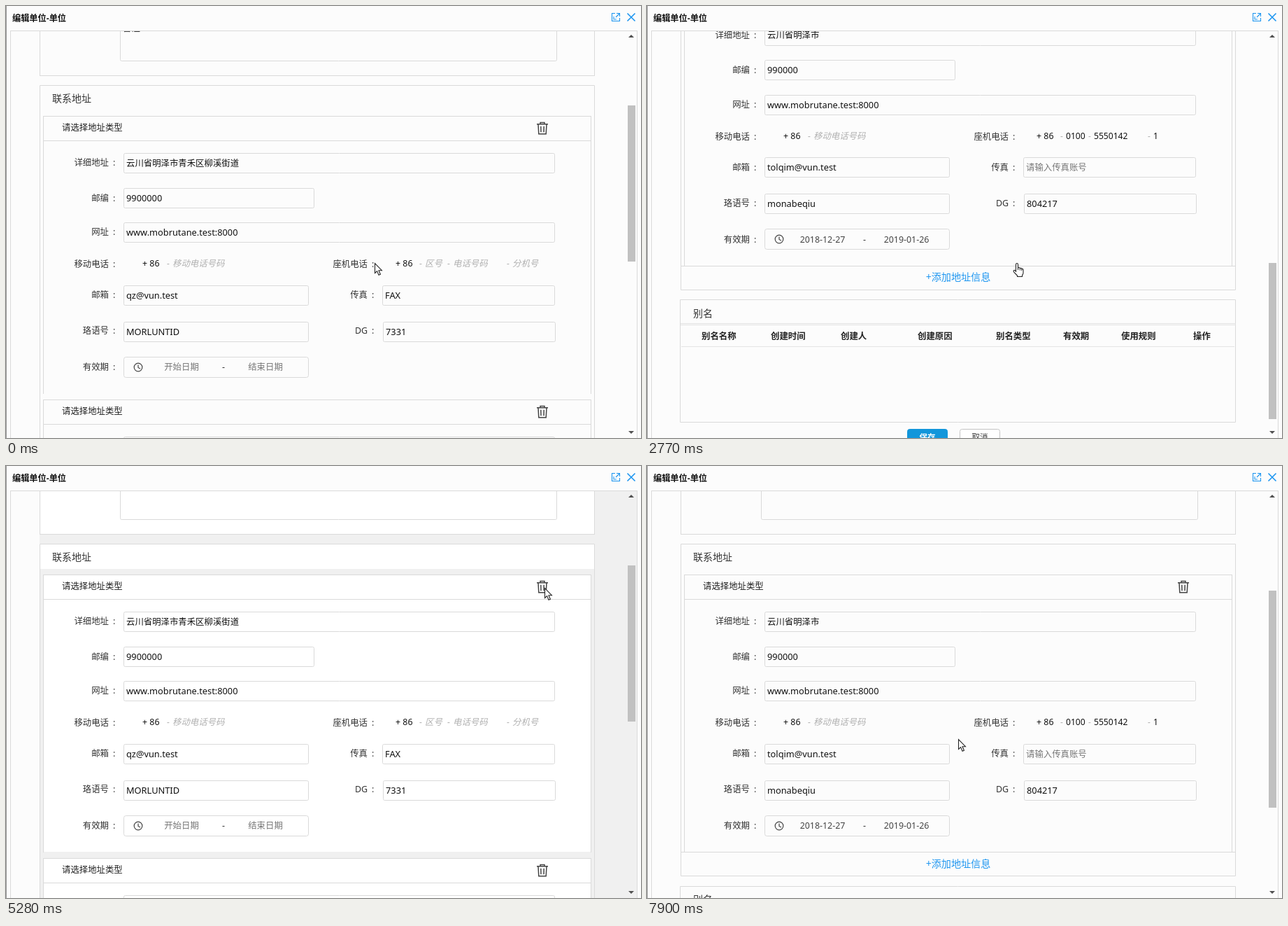
Recreate the animation shown at these times as an HTML page with a canvas. Size 908 by 617 pixels, loop 8 s.

```html
<!DOCTYPE html>
<html lang="zh-CN">
<head>
<meta charset="utf-8">
<style>
html, body { margin: 0; width: 100%; height: 100%; overflow: hidden; background: #fcfcfc; }
canvas { display: block; }
</style>
</head>
<body>
<canvas id="stage" width="908" height="617"></canvas>
<script>
const ctx = document.getElementById('stage').getContext('2d');
const LOOP = 8000;
const FAMILY = '"Noto Sans", "Noto Sans CJK SC", sans-serif';
const LINE = '#dadada', PAPER = '#fcfcfc', BLUE = '#1e96f0';
const CARD_STEP = 405;

// [time, y of the first address card]
const SCROLL = [
  [0, 157], [150, 130], [270, 57], [550, 0], [700, -43], [820, -143], [940, -243],
  [1240, -283.5], [1390, -343], [1700, -400], [1820, -443], [1960, -462],
  [2770, -430.5], [2890, -385], [3010, -362], [3130, -350], [3530, -300], [3650, -262],
  [3770, -215], [3920, -180], [4070, -150], [4190, -97.6], [4340, 0], [4460, 85],
  [4610, 138], [4740, 155]
];

// [time, x, y, shape]
const POINTER = [
  [0, 527, 367, 'arrow'], [1820, 527, 367, 'hand'], [2890, 527, 367, 'arrow'],
  [3530, 541, 366, 'arrow'], [4190, 541, 366, 'beam'], [4340, 541, 366, 'arrow'],
  [4460, 560, 355, 'arrow'], [4610, 650, 290, 'arrow'], [4740, 743, 219, 'arrow'],
  [4890, 758, 191, 'arrow'], [5040, 764, 181, 'arrow'], [5160, 768, 176, 'arrow'],
  [5280, 770, 174, 'arrow'], [5870, 700, 222, 'arrow'], [6000, 609, 270, 'arrow'],
  [6150, 530, 312, 'arrow'], [6270, 470, 345, 'arrow'], [6390, 440, 360, 'hand'],
  [6510, 435, 363, 'hand'], [7410, 435, 363, 'arrow'], [7780, 440, 379, 'arrow'],
  [7900, 445, 390, 'arrow']
];

const FIRST = {
  address: '云川省明泽市青禾区柳溪街道', zip: '9900000', site: 'www.mobrutane.test:8000',
  mail: 'qz@vun.test', fax: 'FAX', chat: 'MORLUNTID', number: '7331'
};
const SECOND = {
  address: '云川省明泽市', zip: '990000', site: 'www.mobrutane.test:8000',
  phone: ['0100', '5550142', '1'], mail: 'tolqim@vun.test', chat: 'monabeqiu',
  number: '804217', dates: ['2018-12-27', '2019-01-26']
};

function keyAt(keys, t) {
  let found = keys[0];
  for (const key of keys) if (key[0] <= t) found = key;
  return found;
}

// Scrolled offsets can be fractional; edges snap to whole pixels.
const snap = Math.round;

function rect(x, y, w, h, color) {
  ctx.fillStyle = color;
  ctx.fillRect(x, snap(y), w, snap(y + h) - snap(y));
}
function hline(x1, x2, y, color = LINE) {
  rect(x1, snap(y), x2 - x1 + 1, 1, color);
}
const vline = (x, y1, y2, color = LINE) => rect(x, y1, 1, y2 - y1 + 1, color);

function box(x1, y1, x2, y2, { fill, stroke = LINE, radius = 2 } = {}) {
  ctx.beginPath();
  ctx.roundRect(x1 + .5, snap(y1) + .5, x2 - x1, snap(y2) - snap(y1), radius);
  if (fill) { ctx.fillStyle = fill; ctx.fill(); }
  if (stroke) { ctx.strokeStyle = stroke; ctx.lineWidth = 1; ctx.stroke(); }
}

// y is the vertical middle of the glyphs
function text(str, x, y, { size = 12.4, color = '#222', style = '', align = 'left' } = {}) {
  ctx.font = `${style} ${size}px ${FAMILY}`;
  ctx.fillStyle = color;
  ctx.textAlign = align;
  ctx.fillText(str, x, snap(y + size * .36));
}

function stroke(color, width, ...lines) {
  ctx.strokeStyle = color;
  ctx.lineWidth = width;
  ctx.beginPath();
  for (const pts of lines) {
    for (let i = 0; i < pts.length; i += 2) {
      if (i) ctx.lineTo(pts[i], pts[i + 1]);
      else ctx.moveTo(pts[i], pts[i + 1]);
    }
  }
  ctx.stroke();
}

function triangle(x, y, dx, dy, color = '#505050') {
  ctx.fillStyle = color;
  ctx.beginPath();
  ctx.moveTo(x + dx * 2, y + dy * 2);
  ctx.lineTo(x - dx * 2 + dy * 4, y - dy * 2 + dx * 4);
  ctx.lineTo(x - dx * 2 - dy * 4, y - dy * 2 - dx * 4);
  ctx.fill();
}

const cross = (x, y, r) => stroke(BLUE, 1.6, [x - r, y - r, x + r, y + r], [x + r, y - r, x - r, y + r]);

function label(str, right, y) {
  text(str, right, y, { color: '#333', align: 'right' });
  text(':', right + 6, y, { color: '#333' });
}

function field(x1, x2, y, value, hint) {
  box(x1, y, x2, y + 28);
  if (value) text(value, x1 + 4, y + 14.4, { size: /^[\x00-\x7f]/.test(value) ? 12.8 : 12.4, color: '#111' });
  else if (hint) text(hint, x1 + 4, y + 14.4, { color: '#777' });
}

function trash(x, y) {
  stroke('#444', 1.5,
    [x - 8, y - 6, x + 8, y - 6], [x - 3, y - 6, x - 3, y - 8.2, x + 3, y - 8.2, x + 3, y - 6],
    [x - 6, y - 6, x - 5.2, y + 8, x + 5.2, y + 8, x + 6, y - 6],
    [x - 2.2, y - 3, x - 2, y + 5.5], [x + 2.2, y - 3, x + 2, y + 5.5]);
}

function clock(x, y) {
  ctx.strokeStyle = '#444';
  ctx.lineWidth = 1.2;
  ctx.beginPath();
  ctx.arc(x, y, 5.8, 0, Math.PI * 2);
  ctx.stroke();
  stroke('#444', 1.2, [x, y - 3.5, x, y + .5, x + 3, y + 2]);
}

function phoneParts(y, parts, hints, places) {
  hints.forEach((hint, i) => {
    const [dash, x] = places[i];
    const faint = { color: '#b0b0b0', style: 'italic' };
    text('-', dash, y, faint);
    if (parts) text(parts[i], x, y, { size: 12.1, color: '#111' });
    else text(hint, x, y, faint);
  });
}

function card(y, data) {
  hline(53, 836, y);
  hline(53, 836, y + 35);
  vline(53, y, y + 396);
  vline(836, y, y + 396);
  text('请选择地址类型', 80, y + 17);
  trash(767, snap(y) + 17.7);

  label('详细地址', 147, y + 67);
  field(168, 784, y + 53, data.address);
  label('邮编', 147, y + 117.5);
  field(168, 440, y + 102.6, data.zip);
  label('网址', 147, y + 166);
  field(168, 784, y + 152, data.site);

  label('移动电话', 147, y + 212);
  label('座机电话', 517, y + 212);
  for (const x of [195, 557]) text('+ 86', x, y + 211, { color: '#111' });
  phoneParts(y + 211, null, ['移动电话号码'], [[230, 238]]);
  phoneParts(y + 211, data.phone, ['区号', '电话号码', '分机号'], [[591, 599], [631, 639], [716, 724]]);

  label('邮箱', 147, y + 255.6);
  field(168, 432, y + 241.7, data.mail);
  label('传真', 517, y + 255.6);
  field(538, 784, y + 241.7, data.fax, '请输入传真账号');
  label('珞语号', 147, y + 307);
  field(168, 432, y + 293.6, data.chat);
  label('DG', 517, y + 307);
  field(539, 785, y + 293.6, data.number);

  label('有效期', 147, y + 358.8);
  box(168, y + 343.6, 432, y + 372.6, { radius: 3 });
  clock(189, snap(y + 343.6) + 15);
  const look = { align: 'center', color: data.dates ? '#444' : '#777' };
  const [from, to] = data.dates || ['开始日期', '结束日期'];
  text(from, 251, y + 358.8, look);
  text('-', 311, y + 358.8, { align: 'center', color: '#333' });
  text(to, 371, y + 358.8, look);
}

function aliasSection(y) {
  box(47, y, 841, y + 175, { radius: 0 });
  text('别名', 66, y + 19.5, { size: 14, color: '#333' });
  hline(48, 841, y + 34, '#e2e2e2');
  hline(48, 841, y + 36, '#e2e2e2');
  const heads = [['别名名称', 78], ['创建时间', 177], ['创建人', 277], ['创建原因', 387],
    ['别名类型', 499], ['有效期', 595], ['使用规则', 678], ['操作', 781]];
  for (const [name, x] of heads) text(name, x, y + 52, { style: 'bold' });
  hline(49, 839, y + 67, '#e4e4e4');

  box(372, y + 184.7, 429, y + 211.7, { fill: '#1296db', stroke: '#1296db', radius: 3 });
  text('保存', 401, y + 197, { size: 11.5, color: '#fff', style: 'bold', align: 'center' });
  box(447, y + 184.7, 504, y + 211.7, { fill: '#fff', stroke: '#c4c4c4', radius: 3 });
  text('取消', 476, y + 197, { size: 11.5, color: '#333', align: 'center' });
}

function shade(top, count) {
  rect(48, 35, 854, 582, '#f0f0f0');
  rect(48, 35, 794, top - 93, '#fff');
  rect(48, top - 44, 794, 36, '#fff');
  for (let i = 0; i < count; i++) rect(53, top + i * CARD_STEP, 784, 396, '#fff');
}

function page(top, cards, shaded) {
  if (shaded) shade(top, cards.length);
  // remarks section
  vline(48, 0, top - 58);
  vline(841, 0, top - 58);
  hline(48, 841, top - 58);
  box(163, top - 200, 787, top - 79);
  text('备注', 167, top - 125);

  // address section
  const end = top + (cards.length - 1) * CARD_STEP + 396;
  box(48, top - 44, 841, end + 34, { radius: 0 });
  text('联系地址', 66, top - 25, { size: 14, color: '#333' });
  cards.forEach((data, i) => card(top + i * CARD_STEP, data));
  hline(48, 841, end);
  text('+添加地址信息', 445, end + 16.7, { size: 14.1, color: BLUE, align: 'center' });

  aliasSection(end + 48.7);
}

function scrollbars(top, count, modal) {
  const view = modal ? 567 : 582, track = view - 31;
  const height = 1439 - (2 - count) * CARD_STEP;
  triangle(894, 43, 0, -1);
  triangle(894, 35 + view - 8, 0, 1);
  rect(889, Math.floor(51 + (395 - top) * track / height), 11, Math.round(track * view / height), '#c1c1c1');
  if (!modal) return;
  rect(7, 602, 880, 15, PAPER);
  rect(887, 602, 15, 15, '#dcdcdc');
  rect(22, 604, 836, 11, '#c1c1c1');
  triangle(14, 609.5, -1, 0, '#a3a3a3');
  triangle(880, 609.5, 1, 0);
}

function questionIcon(x, y) {
  const tone = ctx.createRadialGradient(x - 2, y - 5, 2, x, y, 15);
  tone.addColorStop(0, '#fff');
  tone.addColorStop(.5, '#cfe8fa');
  tone.addColorStop(1, '#4a9bd8');
  ctx.fillStyle = tone;
  ctx.beginPath();
  ctx.ellipse(x, y, 14, 13, 0, 0, Math.PI * 2);
  ctx.moveTo(x, y + 11);
  ctx.lineTo(x + 6, y + 16);
  ctx.lineTo(x + 8, y + 9);
  ctx.fill();
  text('?', x, y, { size: 19, color: '#0b3f94', style: 'bold', align: 'center' });
}

function dialog(hover) {
  rect(7, 35, 880, 567, 'rgba(0,0,0,.2)');
  box(348, 264, 559, 390, { fill: 'rgba(0,0,0,.13)', stroke: null, radius: 9 });
  box(351, 266, 556, 387, { fill: 'rgba(0,0,0,.13)', stroke: null, radius: 6 });
  const paper = ctx.createLinearGradient(0, 269, 0, 305);
  paper.addColorStop(0, '#f3f3f3');
  paper.addColorStop(1, '#fdfdfd');
  rect(354, 269, 200, 115, paper);
  text('提示', 362, 286.5, { size: 11, color: '#111', style: 'bold' });
  cross(540, 285, 5.5);
  questionIcon(382, 318);
  text('确定要删除该条地址信息？', 409, 314, { size: 10.9 });
  box(388, 349, 448, 373, hover ? { fill: '#e8f4ff', stroke: '#b9dcf7' } : { fill: '#fbfbfb' });
  box(460, 349, 520, 373, { fill: '#fbfbfb' });
  text('是', 418.5, 361, { size: 11, align: 'center', color: '#111' });
  text('否', 489.5, 361, { size: 11, align: 'center', color: '#111' });
}

function windowFrame() {
  vline(0, 0, 616, '#9a9a9a');
  text('编辑单位-单位', 9, 17.5, { size: 12.2, color: '#111', style: 'bold' });
  hline(6, 902, 35);
  vline(6, 35, 616);
  vline(902, 35, 616);
  stroke(BLUE, 1.1, [871, 10.5, 866.5, 10.5, 866.5, 21.5, 877.5, 21.5, 877.5, 17],
    [873, 10.5, 877.5, 10.5, 877.5, 15], [877.5, 10.5, 872, 16], [869, 15, 869, 19, 873, 19]);
  cross(894, 16, 5.5);
}

const SHAPES = {
  arrow: new Path2D('M.5 .5V14.5L3.6 11.6L6 17.2L8.4 16.2L6 10.7H10.4Z'),
  hand: new Path2D('M3.5 13V2.2Q3.5 .5 5 .5T6.5 2.2V7Q8.5 5.8 9.3 7.6Q11 6.6 11.8 8.5Q14 7.8 14 10.3V14Q14 16 12.5 17.5V19.5H5.5V18L1 13.4Q-.6 11.2 .8 10.5Q2 10 3.5 12')
};

function pointer([, x, y, shape]) {
  if (shape === 'beam') {
    stroke('#222', 1.2, [x - 3, y + .5, x + 3, y + .5], [x, y, x, y + 14], [x - 3, y + 14, x + 3, y + 14]);
    return;
  }
  ctx.save();
  ctx.translate(shape === 'hand' ? x - 3 : x, y);
  ctx.fillStyle = '#fff';
  ctx.strokeStyle = '#222';
  ctx.lineWidth = 1.1;
  ctx.fill(SHAPES[shape]);
  ctx.stroke(SHAPES[shape]);
  if (shape === 'hand') stroke('#222', 1, [6.5, 7, 6.5, 10], [9.3, 7.6, 9.3, 10.5], [11.8, 8.5, 11.8, 11]);
  ctx.restore();
}

function draw(t) {
  const top = keyAt(SCROLL, t)[1];
  const cursor = keyAt(POINTER, t);
  const modal = t >= 5560 && t < 7410;
  const cards = t < 7410 ? [FIRST, SECOND] : [SECOND];

  rect(0, 0, 908, 617, PAPER);
  ctx.save();
  ctx.beginPath();
  ctx.rect(7, 36, 895, 581);
  ctx.clip();
  page(top, cards, t >= 4740 && t < 5560);
  if (modal) dialog(t >= 6390);
  scrollbars(top, cards.length, modal);
  ctx.restore();
  windowFrame();
  pointer(cursor);
}

function tick() {
  draw(performance.now() % LOOP);
  requestAnimationFrame(tick);
}
tick();
</script>
</body>
</html>
```
